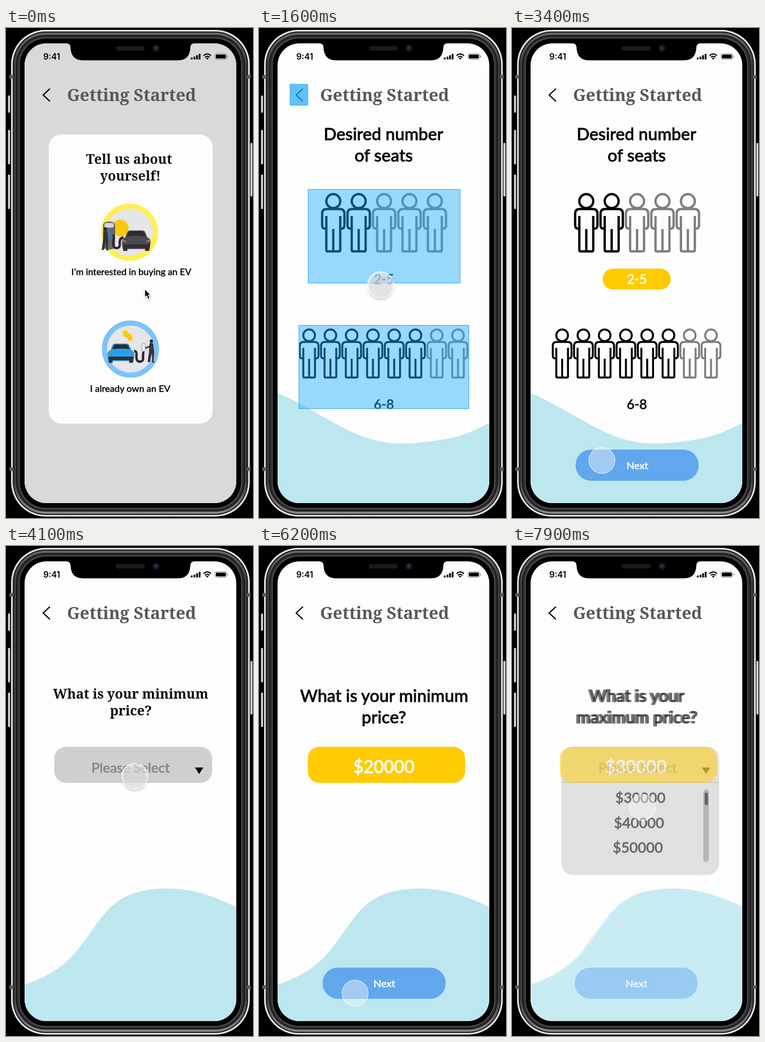
Animation, 532 px wide and 1053 px high, one loop 8 s. Source, as an HTML page:

```html
<!DOCTYPE html>
<html lang="en">
<head>
<meta charset="utf-8">
<title>Getting Started</title>
<style>
html, body { margin: 0; width: 100%; height: 100%; overflow: hidden; background: #000; }
svg { display: block; width: 100%; height: 100%; }
text { text-anchor: middle; }
.sans { font-family: Lato, "Open Sans", sans-serif; font-weight: 500; stroke-width: .025em; stroke-linejoin: round; }
.serif { font-family: "Noto Serif", serif; font-weight: 600; }
.status { font-family: Inter, sans-serif; font-weight: 600; }
</style>
</head>
<body>
<svg viewBox="0 0 532 1053" xmlns="http://www.w3.org/2000/svg">
  <defs>
    <clipPath id="screenClip"><rect x="40" y="33" width="456" height="988" rx="47"/></clipPath>
    <linearGradient id="band" x1="0" y1="0" x2="0" y2="1">
      <stop offset="0" stop-color="#66666a"/><stop offset=".07" stop-color="#3a3a3d"/>
      <stop offset=".93" stop-color="#3a3a3d"/><stop offset="1" stop-color="#88888b"/>
    </linearGradient>
    <linearGradient id="key" x1="0" x2="1">
      <stop offset="0" stop-color="#77777a"/><stop offset=".5" stop-color="#eeeef0"/><stop offset="1" stop-color="#8a8a8d"/>
    </linearGradient>
    <filter id="soft" x="-50%" y="-50%" width="200%" height="200%"><feGaussianBlur stdDeviation="2.5"/></filter>
    <g id="person" fill="none" stroke-width="5" stroke-linejoin="round">
      <circle cy="16" r="15"/>
      <path d="M-15 75H-18Q-24 75-24 68V43Q-24 33-14 33H14Q24 33 24 43V68Q24 75 18 75H15"/>
      <path d="M-15 48V121Q-15 124-12 124H12Q15 124 15 121V48M0 76V124"/>
    </g>
    <g id="car">
      <path d="M-31 8Q-31-1-24-3L-19-15Q-17-18-12-18H12Q17-18 19-15L24-3Q31-1 31 8L29 22H-29Z"/>
      <path d="M-20-5L-16-14Q-15-16-12-16H12Q15-16 16-14L20-5Q0-8-20-5Z" fill="#2c2b30"/>
      <path d="M-29 12H29L28 20H-28Z M-28 18h9v8h-9z M19 18h9v8h-9z" fill="#302f34"/>
      <path d="M-30 2l9 2-1 3-8-1z M30 2l-9 2 1 3 8-1z" fill="#a57967"/>
    </g>
    <g id="driver">
      <circle cy="4" r="3.6" fill="#28272c"/>
      <path d="M-4 9Q0 6 4 9L6 27L5 46L7 50H2L1 30L-3 49H-8L-5 28Z" fill="#34333a"/>
    </g>
  </defs>

  <rect width="532" height="1053" fill="#000"/>
  <g id="shell"></g>
  <g clip-path="url(#screenClip)">
    <rect x="40" y="33" width="456" height="988" fill="#fefdfe"/>
    <g id="scenes"></g>
    <text class="serif" x="270.5" y="157" font-size="36" fill="#58575a">Getting Started</text>
    <path d="M94 131 80 144 94 157" fill="none" stroke="#000" stroke-width="2.5" stroke-linecap="round" stroke-linejoin="round"/>
    <g id="hints"></g>
  </g>
  <g id="notch">
    <path d="M131 30V33Q139 34 139 42Q140 69.500 166 69.500H370Q396 69.500 397 42Q397 34 405 33V30Z"/>
    <rect x="236" y="39" width="63" height="9.500" rx="4.700" fill="#1b1b1d"/>
    <circle cx="323" cy="43.500" r="8" fill="#11151c"/>
    <circle cx="323" cy="43.500" r="4" fill="#14304a"/>
    <circle cx="321.500" cy="42.500" r="1.500" fill="#2c5a80"/>
  </g>
  <g id="status">
    <text class="status" x="98.500" y="67.500" font-size="18">9:41</text>
    <path d="M400 67.500V63.500M406 67.500V61.500M411.500 67.500V58.500M417 67.500V55.500" stroke="#000" stroke-width="3.800"/>
    <path d="M425.500 59.500Q433.500 52 441.500 59.500M428.500 63Q433.500 58.500 438.500 63" fill="none" stroke="#000" stroke-width="2.500"/>
    <path d="M430.500 65Q433.500 62.500 436.500 65L433.500 68Z"/>
    <rect x="450" y="55" width="25.500" height="12.500" rx="3.700" fill="none" stroke="#777"/>
    <rect x="452" y="57" width="21.500" height="8.500" rx="2"/>
    <path d="M477 59Q480 61 477 64Z" fill="#777"/>
  </g>
  <g id="touch">
    <circle id="shade" cy="5" r="27" fill="#000" filter="url(#soft)"/>
    <circle r="28" fill="#f4f5f9" fill-opacity=".6" stroke="#fff" stroke-width="1.500"/>
  </g>
  <g id="arrow">
    <path d="M0 2V21L4.500 17L8 24.500L11.500 23L8.500 16H14Z" opacity=".35" filter="url(#soft)"/>
    <path d="M0 0V18L4 14.300L7.300 21.500L10.700 20L7.600 13H13Z" stroke="#fff" stroke-width="1.300"/>
  </g>
</svg>
<script>
const LOOP = 8000, YELLOW = "#ffcb00";
const el = id => document.getElementById(id);
const rect = (x, y, x2, y2, r, fill, more = "") =>
  `<rect x="${x}" y="${y}" width="${x2 - x}" height="${y2 - y}" rx="${r}" fill="${fill}" ${more}/>`;
const text = (str, x, y, size, fill = "#0b0b0c", cls = "sans") =>
  `<text class="${cls}" x="${x}" y="${y}" font-size="${size}" fill="${fill}" ${cls === "sans" ? `stroke="${fill}"` : ""}>${str}</text>`;
const path = (d, fill, stroke = "none", w = 1) =>
  `<path d="${d}" fill="${fill}" stroke="${stroke}" stroke-width="${w}" stroke-linejoin="round"/>`;

function shell() {
  const ring = (d, r, fill) => rect(11 + d, 4 + d, 525 - d, 1050 - d, r, fill);
  const keys = [[4, 145, 182], [4, 219, 293], [4, 315, 389], [526, 247, 362]];
  return keys.map(([x, a, b]) => rect(x, a, x + 5, b, 2, "url(#key)")).join("") +
    ring(0, 74, "#e6e6e7") + ring(3.5, 71, "#1c1c1d") + ring(6, 68, "url(#band)") +
    ring(11, 63, "#111112") + ring(13, 61, "#303033") + ring(17, 57, "#5c5c60") + ring(18.5, 56, "#000") +
    [101, 944].map(y => rect(7, y, 16, y + 8, 1, "#59595b") + rect(519, y, 527, y + 8, 1, "#59595b")).join("");
}

const lowWave = path("M20 778L40 785C75 798 110 820 150 842C205 873 250 893 305 893C340 893 375 888 410 882C445 875 470 861 496 849L516 840V1030H20Z", "#bce7ef");
const highWave = path("M20 950L40 943C75 930 105 917 135 889C185 840 205 775 265 750C290 740 320 736 348 736C400 736 450 753 496 776L516 786V1030H20Z", "#bce7ef");
const nextButton = rect(137, 906, 402, 973, 33, "#60a7ee") + text("Next", 270, 947.5, 22, "#fff");

function badge(cx, cy, ring, art) {
  return `<g transform="translate(${cx} ${cy})"><circle r="56" fill="#e6e5e8" stroke="${ring}" stroke-width="11"/>${art}</g>`;
}

function modal() {
  const buy = `<circle cx="-20" cy="-9" r="18" fill="#ffc80a"/>` +
    rect(-57, -23, -31, 37, 9, "#68676c") + rect(-54, -20, -34, -10, 4, "#d5d4d9") +
    rect(-45, -1, -37, 14, 2, "#2d7fbd") +
    path("M-36 5Q-32 8-35 20Q-36 34-28 34Q-20 34-21 24Q-22 12-13 11", "none", "#29282d", 5) +
    `<use href="#driver" x="-52" y="-11"/><use href="#car" x="14.5" y="14" fill="#4b4a50"/>`;
  const own = path("M-11-35L-9-30L-2-28L-1-23", "none", "#ffc80a", 11).replace("/>", ' stroke-linecap="round"/>') +
    path("M8 4Q14 4 13 14Q12 27 20 27Q29 27 27 16L28 4", "none", "#29282d", 5) +
    rect(25, -12, 32, 5, 2, "#f4f4f6", 'stroke="#85848a"') +
    path("M32-2L42-6", "none", "#34333a", 3) +
    `<use href="#driver" x="45" y="-21"/><use href="#car" transform="translate(-20.5 5) scale(.94)" fill="#27a0ea"/>`;
  return rect(20, 20, 516, 1030, 0, "#dad8db") + rect(92, 229, 445, 850, 27, "#fefdfe") +
    text("Tell us about", 265, 292, 28.5, "#141415", "serif") +
    text("yourself!", 268, 328, 28.5, "#141415", "serif") +
    badge(266, 439, "#fdf04f", buy) + text("I’m interested in buying an EV", 270, 531, 19.7) +
    badge(268, 690, "#7cc4f8", own) + text("I already own an EV", 267.5, 782, 19.9);
}

function people(n, dark, x, step, y, scale) {
  let out = "";
  for (let i = 0; i < n; i++)
    out += `<use href="#person" transform="translate(${x + i * step} ${y}) scale(${scale})" stroke="${i < dark ? "#000" : "#7f7d80"}"/>`;
  return out;
}

function seats(picked) {
  return lowWave + text("Desired number", 268, 241, 36.5) + text("of seats", 268.5, 287, 37) +
    people(5, 2, 160, 54.7, 356, 1) + people(8, 6, 108, 45.8, 647, .84) +
    (picked ? rect(195, 517, 342, 562, 22.5, YELLOW) + nextButton : "") +
    text("2-5", 269, 550, 28.5, picked ? "#fff" : "#0b0b0c") + text("6-8", 269, 819, 28.5);
}

const heading = {
  minSerif: text("What is your minimum", 268.5, 328, 28.5, "#0b0b0c", "serif") +
    text("price?", 269, 364, 28.5, "#0b0b0c", "serif"),
  min: text("What is your minimum", 269.5, 335, 36.5) + text("price?", 269, 381, 37),
  max: text("What is your", 268, 335, 36.5) + text("maximum price?", 268.5, 381, 36.5)
};

function priceMenu(title, options, track) {
  const open = options.length > 0;
  let out = highWave + title + rect(104, 431.5, 444, open ? 707 : 509, 25, "#d0cfd0") +
    text("Please Select", 268.5, 487, 29.3, "#88868a") + path("M407 476H425L416 490Z", "#000");
  if (open) {
    out += path("M104 508H444", "none", "#8d8c8f", 1.5) +
      options.map((o, i) => text(o, [274.5, 271.5, 269][i], 552 + i * 53.5, 31)).join("") +
      rect(410, 523, 422, 679, 6, track) + rect(413, 530, 420, 557, 3.5, "#050505");
  }
  return out;
}

const pricePicked = (title, value) => highWave + title + rect(105, 431.5, 444, 509, 25, YELLOW) +
  text(value, 269, 488, 38, "#fff") + nextButton;

// Each scene: start, dissolve length, markup
const scenes = [
  [0, 0, modal()],
  [850, 300, seats(false)],
  [2700, 300, seats(true)],
  [3600, 300, priceMenu(heading.minSerif, [])],
  [4300, 300, priceMenu(heading.minSerif, ["$00000", "$10000", "$20000"], "#aebbc4")],
  [5450, 300, pricePicked(heading.min, "$20000")],
  [6400, 300, priceMenu(heading.max, [])],
  [7000, 300, priceMenu(heading.max, ["$30000", "$40000", "$50000"], "#8a8a8c")],
  [7750, 300, pricePicked(heading.max, "$30000")]
];

// Pointer path: time, x, y, opacity
const moves = [
  [0, 299, 561, 1], [350, 292, 520, 1], [750, 268, 455, 1], [950, 268, 455, 1],
  [1400, 262, 552, 1], [1700, 262, 552, 1], [2300, 281, 435, 1], [2650, 281, 435, 1],
  [3350, 193, 929, .75], [3700, 205, 934, .75], [4150, 280, 480, 1], [4450, 280, 480, 1],
  [5000, 283, 538, 1], [5300, 272, 648, 1], [5550, 272, 648, 1], [6150, 207, 961, .75],
  [6450, 207, 961, .75], [6900, 280, 484, 1], [7200, 280, 484, 1], [7600, 281, 562, 1],
  [7750, 281, 562, 1], [7900, 281, 562, .75], [8000, 281, 562, .75]
];

el("shell").innerHTML = shell();
el("scenes").innerHTML = scenes.map(s => `<g>${s[2]}</g>`).join("");
el("hints").innerHTML = [[67, 121, 105, 166, .7], [106, 347, 433, 548, .45], [86, 639, 452, 818, .45]]
  .map(([x, y, x2, y2, a]) => rect(x, y, x2, y2, 0, "#1dabfa", `fill-opacity="${a}" stroke="#4cb0f3" stroke-width="1.5"`)).join("");

const layers = [...el("scenes").children];
const clamp = v => Math.max(0, Math.min(1, v));
const ease = p => p * p * (3 - 2 * p);
const progress = (i, t) => {
  if (i === 0) return 1;
  if (i >= scenes.length) return 0;
  return ease(clamp((t - scenes[i][0]) / scenes[i][1]));
};

function pointer(t) {
  let i = 0;
  while (i < moves.length - 2 && moves[i + 1][0] <= t) i++;
  const a = moves[i], b = moves[i + 1], p = ease(clamp((t - a[0]) / (b[0] - a[0])));
  return [1, 2, 3].map(k => a[k] + (b[k] - a[k]) * p);
}

function draw(t) {
  layers.forEach((g, i) => {
    const enter = progress(i, t), leave = progress(i + 1, t);
    const alpha = enter * (1 - leave ** 1.4);
    g.style.display = alpha > 0 ? "" : "none";
    g.setAttribute("opacity", alpha);
    g.setAttribute("transform", `translate(${4 * leave - 4 * (1 - enter)} 0)`);
  });
  el("hints").setAttribute("opacity", clamp((t - 1480) / 80) * clamp((2050 - t) / 250));
  const [x, y, alpha] = pointer(t), mouse = t < 350;
  for (const id of ["arrow", "touch"]) {
    el(id).setAttribute("transform", `translate(${x} ${y})`);
    el(id).setAttribute("opacity", (id === "arrow") === mouse ? alpha : 0);
  }
  el("shade").setAttribute("opacity", .2 * clamp(alpha * 4 - 3));
}

const start = performance.now();
function tick() {
  draw((performance.now() - start) % LOOP);
  requestAnimationFrame(tick);
}
draw(0);
requestAnimationFrame(tick);
</script>
</body>
</html>
```
